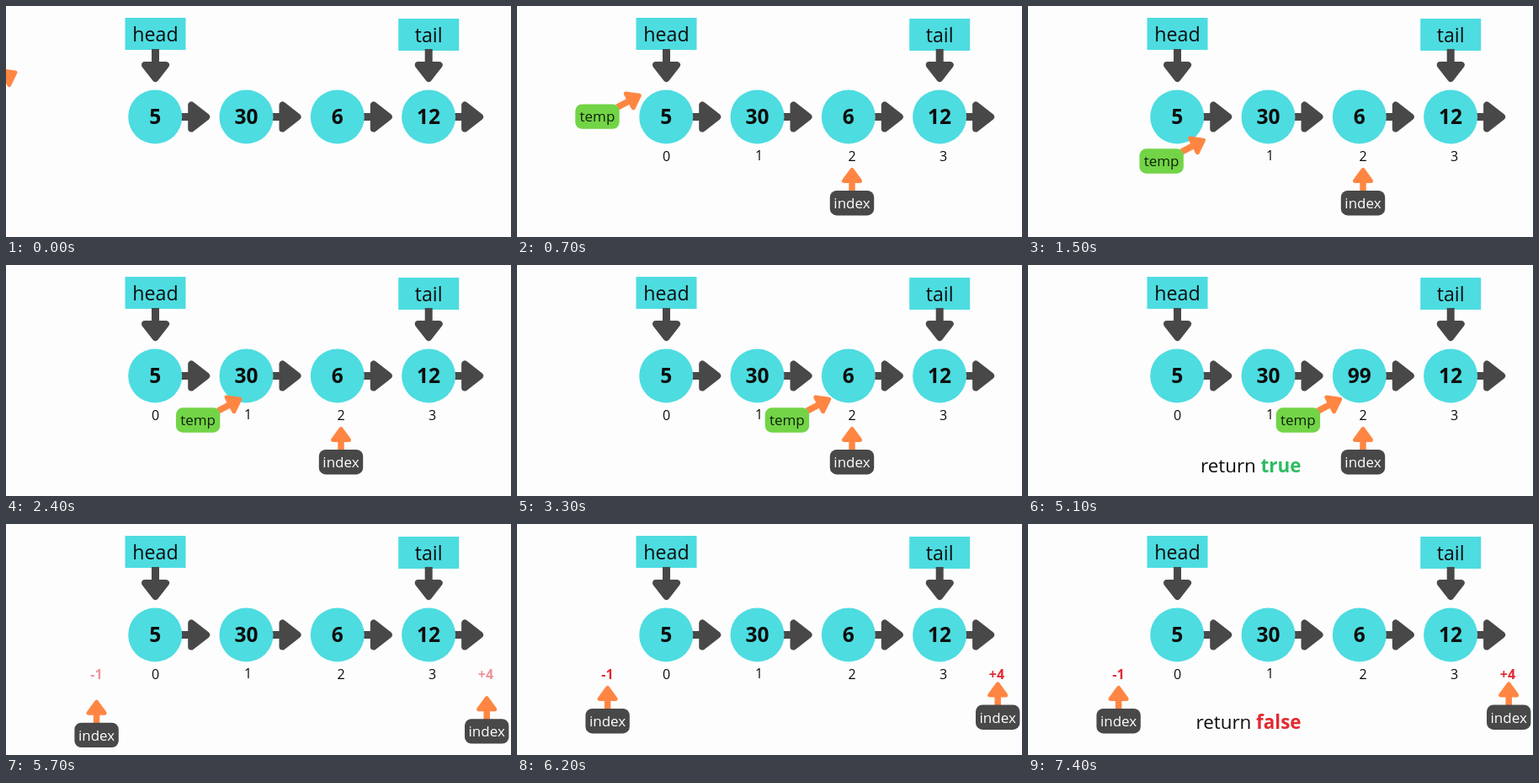
Animation of 600 by 274 pixels, one loop 7.5 s. Source, as an HTML page:

```html
<!DOCTYPE html>
<html lang="en">
<head>
<meta charset="utf-8">
<title>Linked list: set value at index</title>
<style>
html, body { margin: 0; width: 100%; height: 100%; overflow: hidden; background: #fdfdfe; }
svg { display: block; width: 600px; height: 274px; }
text { font-family: "Open Sans", "Noto Sans", sans-serif; fill: #0d0d0d; }
.title { font-size: 23.2px; }
.value { font-size: 24.5px; font-weight: 700; }
.tag { font-size: 17px; }
.num { font-size: 16px; }
.result { font-size: 22.4px; }
.bold { font-weight: 700; }
</style>
</head>
<body>
<svg id="stage" viewBox="0 0 600 274"></svg>
<script>
const LOOP = 7500, SCENE2 = 5400;
const CYAN = '#4ddce0', DARK = '#484848', ORANGE = '#ff8642', GREEN = '#72d446', RED = '#e22a32';
const stage = document.getElementById('stage');

function add(parent, tag, attrs = {}, text) {
  const el = document.createElementNS('http://www.w3.org/2000/svg', tag);
  for (const key in attrs) el.setAttribute(key, attrs[key]);
  if (text !== undefined) el.textContent = text;
  parent.appendChild(el);
  return el;
}
const group = (parent = stage) => add(parent, 'g');
const label = (parent, x, y, text, cls, fill) =>
  add(parent, 'text', { x, y, class: cls, 'text-anchor': 'middle', ...(fill && { style: 'fill:' + fill }) }, text);

// Arrow pointing right before rotation; (x, y) is the middle of the head's base.
function arrow(parent, x, y, angle, color, { half, depth, stem, width, round }) {
  const g = add(parent, 'g', { transform: `translate(${x} ${y}) rotate(${angle})`, fill: color });
  add(g, 'rect', { x: -stem, y: -width / 2, width: stem + 3, height: width });
  add(g, 'path', {
    d: `M${round} ${round - half}V${half - round}L${depth - round} 0Z`,
    stroke: color, 'stroke-width': round * 2, 'stroke-linejoin': 'round'
  });
}
const nextArrow = { half: 18, depth: 26, stem: 9, width: 9, round: 4 };
const downArrow = { half: 16.5, depth: 24, stem: 15, width: 9, round: 4 };
const smallArrow = { half: 12, depth: 18, stem: 14, width: 7.5, round: 2.5 };

function tag(parent, x, y, text, fill, color) {
  add(parent, 'rect', { x, y, width: 52.4, height: 29.4, rx: 8, fill });
  label(parent, x + 26.2, y + 21, text, 'tag', color);
}
function pointer(text, x, y) {
  add(stage, 'rect', { x: x - 36, y, width: 72, height: 38, fill: CYAN });
  label(stage, x, y + 27.7, text, 'title');
  arrow(stage, x, 66, 90, DARK, downArrow);
}
function indexTag(x, y) {
  const g = group();
  arrow(g, x, y - 9, -90, ORANGE, smallArrow);
  tag(g, x - 26.2, y, 'index', DARK, '#fff');
  return g;
}
function result(x, y, word, color) {
  const el = add(stage, 'text', { x, y, class: 'result' }, 'return ');
  add(el, 'tspan', { class: 'bold', style: 'fill:' + color }, word);
  return el;
}

// Static list
pointer('head', 177.5, 14);
pointer('tail', 502.2, 15);
const values = ['5', '30', '6', '12'].map((text, i) => {
  const x = 177.2 + i * 108.3;
  arrow(stage, x + 39, 131.5, 0, DARK, nextArrow);
  add(stage, 'circle', { cx: x, cy: 131.5, r: 32, fill: CYAN });
  return label(stage, x, 140.3, text, 'value');
});
const newValue = label(stage, 393.8, 140.3, '99', 'value');

const numbers = group();
[[177.5, 183.5], [287.7, 182.5], [398, 183.5], [506.7, 183.5]]
  .forEach(([x, y], i) => label(numbers, x, y, i, 'num'));
const badNumbers = group();
label(badNumbers, 107.5, 184, '-1', 'num bold', RED);
label(badNumbers, 570, 184, '+4', 'num bold', RED);

// Moving parts
const index = indexTag(398, 219);
const lowIndex = indexTag(107.6, 219);
const highIndex = indexTag(571.2, 214.5);
const temp = group();
arrow(temp, 131.5, 113.2, -28, ORANGE, smallArrow);
tag(temp, 69.2, 116, 'temp', GREEN, '#10200c');
const resultTrue = result(205, 246, 'true', '#2fbc62');
const resultFalse = result(199.5, 243.3, 'false', RED);

const progress = (t, from, to) => Math.min(1, Math.max(0, (t - from) / (to - from)));
const easeOut = (p, power = 3) => 1 - (1 - p) ** power;
const mix = (a, b, p) => a + (b - a) * p;
const rise = (t, from, to, distance) => distance * (1 - easeOut(progress(t, from, to)));

// start, end, power, then a quadratic curve as three points
const hops = [
  [0, 600, 3, [-135, -27], [-67, -16], [0, 0]],
  [700, 1480, 3, [0, 0], [8, 50], [63, 53.3]],
  [1500, 2200, 3, [63, 53.3], [90, 53.3], [117.5, 53.3]],
  [2330, 3300, 2, [117.5, 53.3], [171.5, 53.3], [225.5, 53.3]]
];
function tempPlace(t) {
  const [from, to, power, a, b, c] = hops.filter(hop => hop[0] <= t).pop();
  const p = easeOut(progress(t, from, to), power);
  return [0, 1].map(i => mix(mix(a[i], b[i], p), mix(b[i], c[i], p), p));
}

const move = (el, x, y) => el.setAttribute('transform', `translate(${x.toFixed(2)} ${y.toFixed(2)})`);
const fade = (el, opacity) => el.setAttribute('opacity', opacity);
const show = (el, on) => el.setAttribute('visibility', on ? 'visible' : 'hidden');

function draw(t) {
  const first = t < SCENE2;
  const swap = first ? progress(t, 3800, 4100) : 0;
  fade(values[2], 1 - swap);
  fade(newValue, swap);

  const entry = progress(t, 50, 400);
  fade(numbers, entry);
  fade(index, entry);
  move(index, 0, rise(t, 50, 500, 20));
  show(index, first);
  show(temp, first);
  move(temp, ...tempPlace(t));
  show(resultTrue, first && t >= 4550);
  move(resultTrue, 0, rise(t, 4550, 5050, 50));

  for (const el of [lowIndex, highIndex]) {
    show(el, !first);
    move(el, 0, rise(t, SCENE2, 6100, 90));
  }
  fade(badNumbers, progress(t, 5500, 5900));
  show(resultFalse, t >= 6800);
  move(resultFalse, 0, rise(t, 6800, 7350, 50));
}

const begin = performance.now();
function tick() {
  draw((performance.now() - begin) % LOOP);
  requestAnimationFrame(tick);
}
tick();
</script>
</body>
</html>
```
